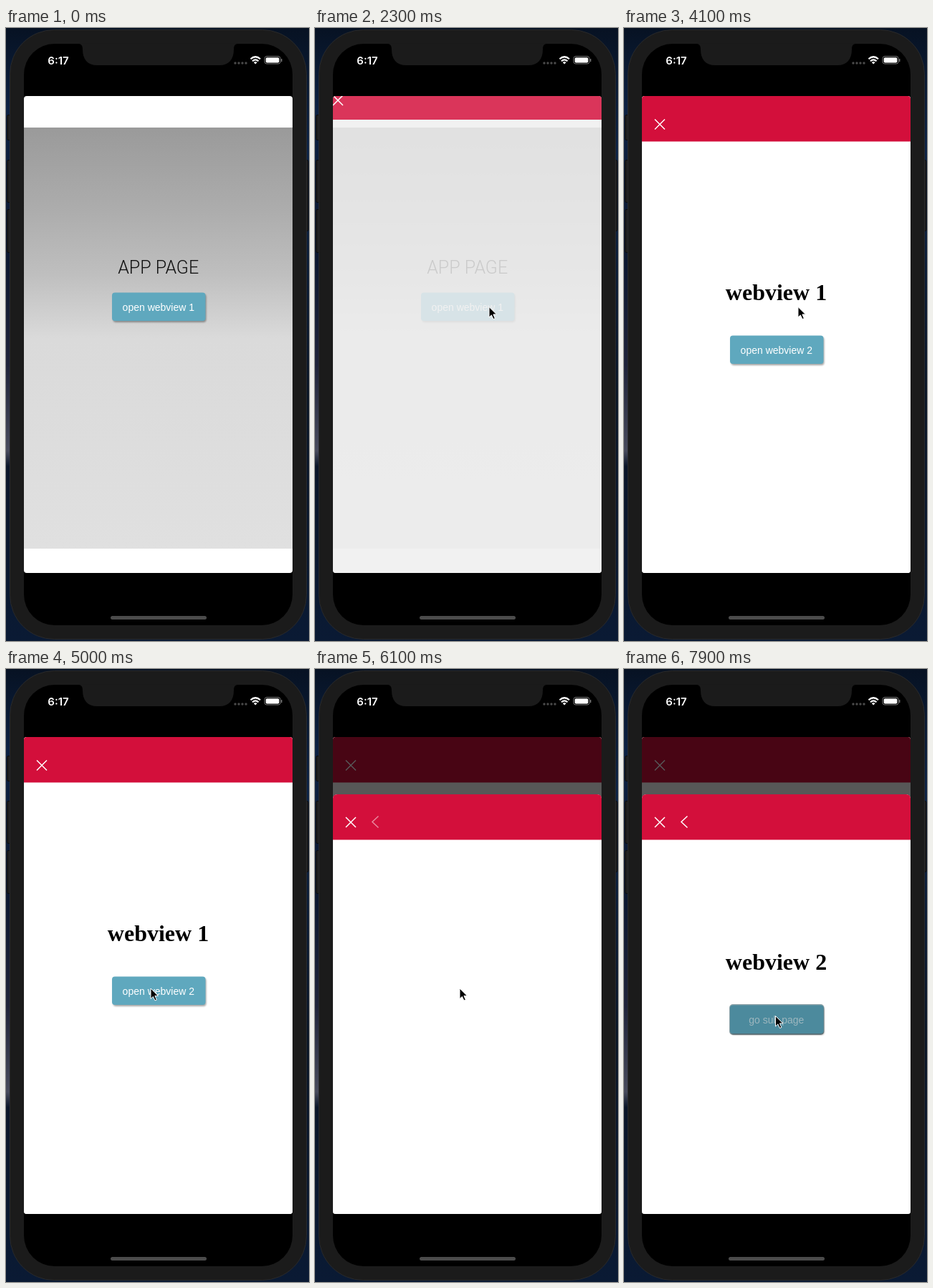
An HTML page that plays this animation: 423 px wide and 856 px high, repeating every 8 s.

```html
<!DOCTYPE html>
<html lang="en">
<head>
<meta charset="utf-8">
<title>Webview demo</title>
<style>
  html, body { margin: 0; width: 100%; height: 100%; overflow: hidden; background: #08111f; }
  svg { display: block; width: 423px; height: 856px; }
  text { text-anchor: middle; }
  .clock { font: 600 15px Inter, sans-serif; fill: #fff; }
  .title { font: 300 25px Roboto, sans-serif; fill: #111; }
  .heading { font: bold 32px "Liberation Serif", serif; }
  .label { font: 14px "Liberation Sans", sans-serif; fill: #fff; }
  .icon { fill: none; stroke: #fff; stroke-width: 1.5; }
</style>
</head>
<body>
<svg viewBox="0 0 423 856">
  <defs>
    <linearGradient id="left" x2="0" y2="1">
      <stop offset="0" stop-color="#071223"/>
      <stop offset=".13" stop-color="#0c2142"/>
      <stop offset=".38" stop-color="#0d1830"/>
      <stop offset=".55" stop-color="#20243a"/>
      <stop offset=".69" stop-color="#484b5c"/>
      <stop offset=".715" stop-color="#0b1629"/>
      <stop offset="1" stop-color="#0a1a34"/>
    </linearGradient>
    <linearGradient id="right" x2="0" y2="1">
      <stop offset="0" stop-color="#071223"/>
      <stop offset=".2" stop-color="#0d2345"/>
      <stop offset=".6" stop-color="#0b1626"/>
      <stop offset="1" stop-color="#0a1a34"/>
    </linearGradient>
    <linearGradient id="page" x2="0" y2="1">
      <stop offset="0" stop-color="#9a9a9a"/>
      <stop offset=".2" stop-color="#adadad"/>
      <stop offset=".35" stop-color="#bfbfbf"/>
      <stop offset=".5" stop-color="#dadada"/>
      <stop offset="1" stop-color="#e0e0e0"/>
    </linearGradient>
    <filter id="soft" x="-10%" y="-20%" width="120%" height="150%"><feGaussianBlur stdDeviation="1.2"/></filter>
    <clipPath id="view"><rect x="25" y="95" width="375" height="666" rx="4"/></clipPath>
    <path id="cross" class="icon" d="M-7-7L7 7M7-7L-7 7"/>
    <path id="chevron" class="icon" d="M4.5-8L-4 0L4.5 8"/>
  </defs>

  <rect width="212" height="856" fill="url(#left)"/>
  <rect x="212" width="211" height="856" fill="url(#right)"/>

  <g fill="#1d1d1e" stroke="#0b0b0c">
    <rect x="1.5" y="121.5" width="8" height="35" rx="2"/>
    <rect x="1.5" y="184.5" width="8" height="59" rx="2"/>
    <rect x="1.5" y="253.5" width="8" height="60" rx="2"/>
    <rect x="414" y="184.5" width="8" height="99" rx="2"/>
  </g>
  <rect x="5.5" y="2.5" width="414" height="851" rx="62" fill="#1b1b1b" stroke="#2a2a2b"/>
  <rect x="25" y="22" width="375" height="812" rx="43"/>
  <path fill="#1b1b1b" d="M99 21.5C105 22 107 24 107 30C107 44 114 52 127 52H298C311 52 318 44 318 30C318 24 320 22 326 21.5Z"/>

  <text class="clock" x="73" y="50.5">6:17</text>
  <g fill="#4a4a4a">
    <circle cx="320" cy="49" r="1.7"/><circle cx="325" cy="49" r="1.7"/>
    <circle cx="330" cy="49" r="1.7"/><circle cx="335" cy="49" r="1.7"/>
  </g>
  <g fill="none" stroke="#fff" stroke-width="2.2">
    <path d="M341.5 43.3Q348.2 37.2 355 43.3"/>
    <path d="M344 46.2Q348.2 42.4 352.5 46.2"/>
  </g>
  <path fill="#fff" d="M345.8 48Q348.2 46 350.6 48L348.2 50.5Z"/>
  <rect x="361" y="39.5" width="22" height="10.5" rx="3" fill="none" stroke="#777"/>
  <rect x="362.7" y="41.2" width="18.6" height="7.2" rx="1.6" fill="#fff"/>
  <path d="M384.7 43v4" stroke="#777" stroke-width="1.4"/>
  <rect x="146" y="821" width="134" height="5" rx="2.5" fill="#4b4b4b"/>

  <g clip-path="url(#view)">
    <rect x="25" y="95" width="375" height="666" fill="#fff"/>
    <rect x="25" y="139" width="375" height="588" fill="url(#page)"/>
    <text class="title" x="212.7" y="342.5">APP PAGE</text>
    <g data-button="open webview 1" data-y="370"></g>

    <g id="web1">
      <rect id="sheet1" x="25" y="95" width="375" height="666"/>
      <rect id="bar1" x="25" y="95" width="375" fill="#d30f3b"/>
      <use id="close1" href="#cross"/>
      <g id="content1">
        <text class="heading" x="212.5" y="380">webview 1</text>
        <g data-button="open webview 2" data-y="430"></g>
      </g>
    </g>

    <rect id="dim" x="25" y="95" width="375" height="666"/>

    <g id="web2">
      <rect id="sheet2" x="25" width="375" height="666" rx="6" fill="#fff"/>
      <path id="bar2" fill="#d30f3b"/>
      <use id="close2" href="#cross"/>
      <use id="back" href="#chevron"/>
      <g id="content2">
        <text class="heading" x="212.5" y="420">webview 2</text>
        <rect id="ring" x="147" y="468" width="132.5" height="43" rx="5" fill="#8fa3a9"/>
        <g data-button="go sub page" data-y="470"></g>
        <rect id="press" x="148" y="469.5" width="130.5" height="40" rx="4" fill="#3b6f7f"/>
      </g>
    </g>
  </g>

  <path id="cursor" d="M0 0V14.5L3.4 11.4L6 17L8.4 16L5.9 10.4H10.5Z" stroke="#fff" stroke-width="1" stroke-linejoin="round"/>
</svg>
<script>
const LOOP = 8000, STEP = 100;
const $ = id => document.getElementById(id);

for (const g of document.querySelectorAll('[data-button]')) {
  const y = +g.dataset.y;
  g.innerHTML = `
    <rect x="149.5" y="${y + 1.5}" width="130" height="39.5" rx="4" fill="#000" opacity=".35" filter="url(#soft)"/>
    <rect x="148" y="${y - .5}" width="130.5" height="39.5" rx="4" fill="#5fa8be"/>
    <text class="label" x="212.8" y="${y + 24.5}">${g.dataset.button}</text>`;
}

const ramp = (t, a, b) => Math.min(1, Math.max(0, (t - a) / (b - a)));
const ease = p => p * p * (3 - 2 * p);
const mix = (a, b, p) => a + (b - a) * p;

// Piecewise-linear or eased lookup in rows of [time, ...values]
function track(rows, t, curve = p => p) {
  let i = 0;
  while (i < rows.length - 2 && t >= rows[i + 1][0]) i++;
  const [a, b] = [rows[i], rows[i + 1]];
  const p = curve(ramp(t, a[0], b[0]));
  return a.slice(1).map((v, k) => mix(v, b[k + 1], p));
}

const pointer = [
  [800, 424, 640], [1700, 243, 389.5], [4600, 243, 389.5], [5000, 202, 446],
  [6700, 202, 446], [7600, 211.5, 484.5], [8000, 211.5, 484.5]
];
const fade1 = [[2100, 0], [2300, .84], [2400, 1]];

const set = (id, attrs) => {
  for (const k in attrs) $(id).setAttribute(k, attrs[k]);
};
const place = (id, x, y, opacity = 1) =>
  set(id, { transform: `translate(${x} ${y})`, opacity });

function draw(t) {
  const [x, y] = track(pointer, t, ease);
  place('cursor', x, y, t < 900 ? 0 : 1);

  // First webview: fades in, then its bar settles below the status area
  const grow = ease(ramp(t, 2300, 2600));
  const grey = Math.round(mix(239, 255, grow));
  set('web1', { opacity: track(fade1, t)[0] });
  set('sheet1', { fill: `rgb(${grey},${grey},${grey})` });
  set('bar1', { height: mix(33, 63.5, grow) });
  place('close1', mix(32, 50, grow), mix(101, 134.5, grow));
  set('content1', { opacity: ramp(t, 3000, 3200) });

  // Second webview: fades in, then drops into a sheet over the dimmed first
  const drop = ease(ramp(t, 5400, 5900));
  const top = mix(95, 175, drop), bottom = mix(182, 238.5, drop);
  set('web2', { opacity: ramp(t, 5200, 5600) });
  set('dim', { opacity: .66 * drop });
  set('sheet2', { y: top });
  set('bar2', { d: `M25 ${bottom}V${top + 6}q0-6 6-6H394q6 0 6 6V${bottom}Z` });
  place('close2', 50, mix(134.5, 214, drop), drop);
  place('back', mix(45, 84, drop), mix(150, 213.5, drop), mix(.5, 1, ramp(t, 6100, 6400)));
  set('content2', { opacity: ramp(t, 6100, 6300) });

  const press = ramp(t, 7600, 7900);
  set('press', { opacity: .5 * press });
  set('ring', { opacity: press });
}

const start = performance.now();
function tick() {
  const t = (performance.now() - start) % LOOP;
  draw(Math.floor(t / STEP) * STEP);
  requestAnimationFrame(tick);
}
tick();
</script>
</body>
</html>
```
